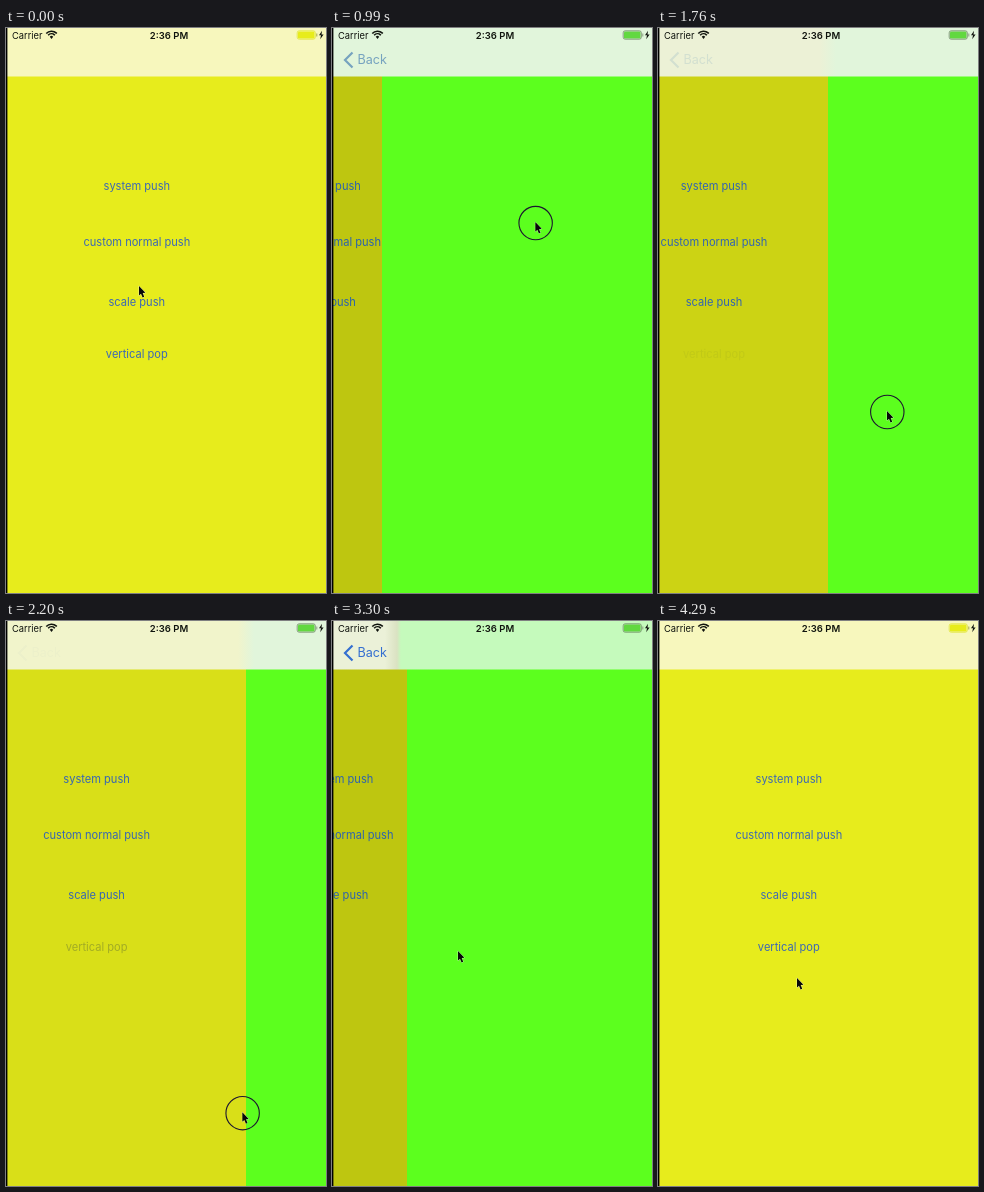
An HTML page with a canvas for the animation above (4.4 s loop, 320 px wide and 565 px high).

```html
<!DOCTYPE html>
<html lang="en">
<head>
<meta charset="utf-8">
<title>Push transition</title>
<style>
html, body { margin: 0; width: 100%; height: 100%; overflow: hidden; background: #000; }
canvas { display: block; width: 320px; height: 565px; }
</style>
</head>
<body>
<canvas id="stage"></canvas>
<script>
const W = 320, H = 565, BAR = 48.5;
const STEP = 110, LOOP = 4400;
const PUSH_MS = 350, SETTLE_MS = 280, DRAG_SPAN = 499;
const FONT = 'Inter, Roboto, sans-serif';
const INK = '#10140e';
const canvas = document.getElementById('stage');
const ctx = canvas.getContext('2d');
const dpr = window.devicePixelRatio || 1;
canvas.width = W * dpr;
canvas.height = H * dpr;

const YELLOW = [231, 236, 28], DIMMED = [190, 198, 16], GREEN = [92, 255, 30];
const BAR_YELLOW = [247, 247, 189], BAR_GREEN = [197, 250, 188];
const BAR_PALE = [235, 241, 216], BAR_MINT = [225, 245, 219];

// Each cycle: tap to push, then drag down and let go to pop
const CYCLES = [
  { push: 164, grab: 680, release: 2240 },
  { push: 3059, grab: 3740, release: 4000 }
];

// Mouse stops: time, x, y
const STOPS = [
  [0, 133, 258], [200, 134, 325], [330, 134, 325], [680, 193, 118],
  [1760, 229, 383], [2240, 237, 501], [2530, 237, 501], [3000, 126, 330],
  [3300, 126, 330], [3740, 131, 180], [4000, 139, 357], [LOOP, 139, 357]
];

const mix = (a, b, k) => a.map((v, i) => v + (b[i] - v) * k);
const rgb = c => `rgb(${c.map(Math.round).join(',')})`;
const clamp = v => Math.max(0, Math.min(1, v));
const ease = v => { const k = clamp(v); return k * k * (3 - 2 * k); };

function mouseAt(t) {
  const i = STOPS.findIndex(s => s[0] > t);
  const [t0, ...from] = STOPS[i - 1], [t1, ...to] = STOPS[i];
  return mix(from, to, (t - t0) / (t1 - t0));
}

// How far the green page has come in, 0 to 1
function progress(t, { push, grab, release }) {
  if (t < grab) return ease((t - push) / PUSH_MS);
  const travel = mouseAt(Math.min(t, release))[1] - mouseAt(grab)[1];
  const held = 1 - travel / DRAG_SPAN;
  return held * (1 - ease((t - release) / SETTLE_MS));
}

function rect(x, y, w, h, fill) {
  ctx.fillStyle = fill;
  ctx.fillRect(x, y, w, h);
}

function box(x, y, w, h, r) {
  ctx.beginPath();
  ctx.roundRect(x, y, w, h, r);
}

function text(str, x, y, size, color, align = 'left', weight = 400) {
  ctx.font = `${weight} ${size}px ${FONT}`;
  ctx.textAlign = align;
  ctx.fillStyle = color;
  ctx.fillText(str, x, y);
}

function polygon(points, x, y) {
  ctx.beginPath();
  points.forEach(([px, py]) => ctx.lineTo(x + px, y + py));
  ctx.closePath();
}

function drawMenu(p) {
  rect(0, BAR - 1, W, H, rgb(mix(YELLOW, DIMMED, clamp(p * 1.4))));
  const x = 130.8 - (W - 1) * p / 2;
  const blue = rgb(mix([60, 104, 180], [40, 98, 172], p));
  const label = (str, y, color = blue) => text(str, x, y, 11.1, color, 'center');
  label('system push', 162);
  label('custom normal push', 218);
  label('scale push', 277.5);
  ctx.globalAlpha = clamp(1 - 1.9 * p);
  label('vertical pop', 330, p > 0 ? '#6f7d30' : blue);
  ctx.globalAlpha = 1;
}

function drawBar(p, edge, dragging) {
  if (p <= 0 || p >= 1) {
    rect(0, 0, W, BAR, rgb(p <= 0 ? BAR_YELLOW : BAR_GREEN));
    return;
  }
  const split = dragging ? edge + 8 : edge - 6;
  const right = dragging ? BAR_MINT : BAR_GREEN;
  let left = mix(BAR_YELLOW, BAR_PALE, clamp(p * 2));
  if (dragging) left = mix(left, BAR_MINT, clamp(p * 2.5 - 1.15));
  const blend = ctx.createLinearGradient(split - 16, 0, split, 0);
  blend.addColorStop(0, rgb(left));
  if (!dragging) blend.addColorStop(.75, 'rgb(218,226,194)');
  blend.addColorStop(1, rgb(right));
  rect(0, 0, W, BAR, blend);
}

function drawBack(alpha, color) {
  ctx.globalAlpha = alpha;
  ctx.strokeStyle = color;
  ctx.lineWidth = 2.2;
  ctx.beginPath();
  ctx.moveTo(20.5, 24.5);
  ctx.lineTo(13, 32);
  ctx.lineTo(20.5, 39.5);
  ctx.stroke();
  text('Back', 25.5, 36.3, 12.6, color);
  ctx.globalAlpha = 1;
}

function drawWifi(x, y) {
  const from = -Math.PI * .76, to = -Math.PI * .24;
  ctx.strokeStyle = ctx.fillStyle = INK;
  ctx.lineWidth = 1.6;
  for (const r of [4.6, 7.2]) {
    ctx.beginPath();
    ctx.arc(x, y, r, from, to);
    ctx.stroke();
  }
  ctx.beginPath();
  ctx.moveTo(x, y + .6);
  ctx.arc(x, y, 2.4, from, to);
  ctx.fill();
}

function drawBattery(on) {
  ctx.fillStyle = on ? '#62d840' : rgb(YELLOW);
  box(292, 3.6, 16.5, 6.8, 1.2);
  ctx.fill();
  ctx.strokeStyle = on ? 'rgba(95,125,85,.8)' : 'rgba(225,230,50,.9)';
  ctx.lineWidth = .9;
  box(291.2, 2.8, 18.1, 8.4, 2);
  ctx.stroke();
  rect(310.3, 5.5, 1, 3, on ? '#8aa180' : '#a5a84a');
  polygon([[3, 0], [0, 4.5], [2, 4.5], [1.2, 8.5], [4.6, 3.6], [2.5, 3.6]], 313, 2.8);
  ctx.fillStyle = INK;
  ctx.fill();
}

function drawStatus(p) {
  text('Carrier', 6, 10.5, 9.3, INK);
  text('2:36 PM', 163, 10.5, 9.5, INK, 'center', 600);
  drawWifi(45.5, 10.4);
  drawBattery(p > 0);
}

function drawMouse([x, y], pressed) {
  if (pressed) {
    ctx.strokeStyle = '#1c1630';
    ctx.lineWidth = 1.1;
    ctx.beginPath();
    ctx.arc(x + .3, y + 1, 16.7, 0, Math.PI * 2);
    ctx.stroke();
  }
  polygon([[0, 0], [0, 9.6], [2, 7.8], [3.6, 11.5], [5.2, 10.8], [3.7, 7.1], [6.4, 6.8]], x, y);
  ctx.strokeStyle = 'rgba(255,255,255,.5)';
  ctx.lineWidth = 1;
  ctx.stroke();
  ctx.fillStyle = '#080808';
  ctx.fill();
}

function draw(t) {
  const cycle = CYCLES.findLast(c => t >= c.push) || CYCLES[0];
  const { push, grab, release } = cycle;
  const p = progress(t, cycle);
  const edge = Math.round(W - (W - 1) * p);
  const dragging = t >= grab;
  const tapped = Math.abs(t - push) < 60;

  ctx.setTransform(dpr, 0, 0, dpr, 0, 0);
  drawMenu(p);
  if (p > 0) rect(edge, BAR - 1, W, H, rgb(GREEN));
  drawBar(p, edge, dragging);
  if (dragging) drawBack(p ** 2.6, '#3c76b0');
  else drawBack(clamp(p * 1.3), '#346fd0');
  drawStatus(p);
  rect(0, 0, 1.4, H, '#000');
  drawMouse(mouseAt(t), tapped || (dragging && t < release));
}

const start = performance.now();
function tick() {
  const t = (performance.now() - start) % LOOP;
  draw(Math.floor(t / STEP) * STEP);
  requestAnimationFrame(tick);
}
tick();
</script>
</body>
</html>
```
